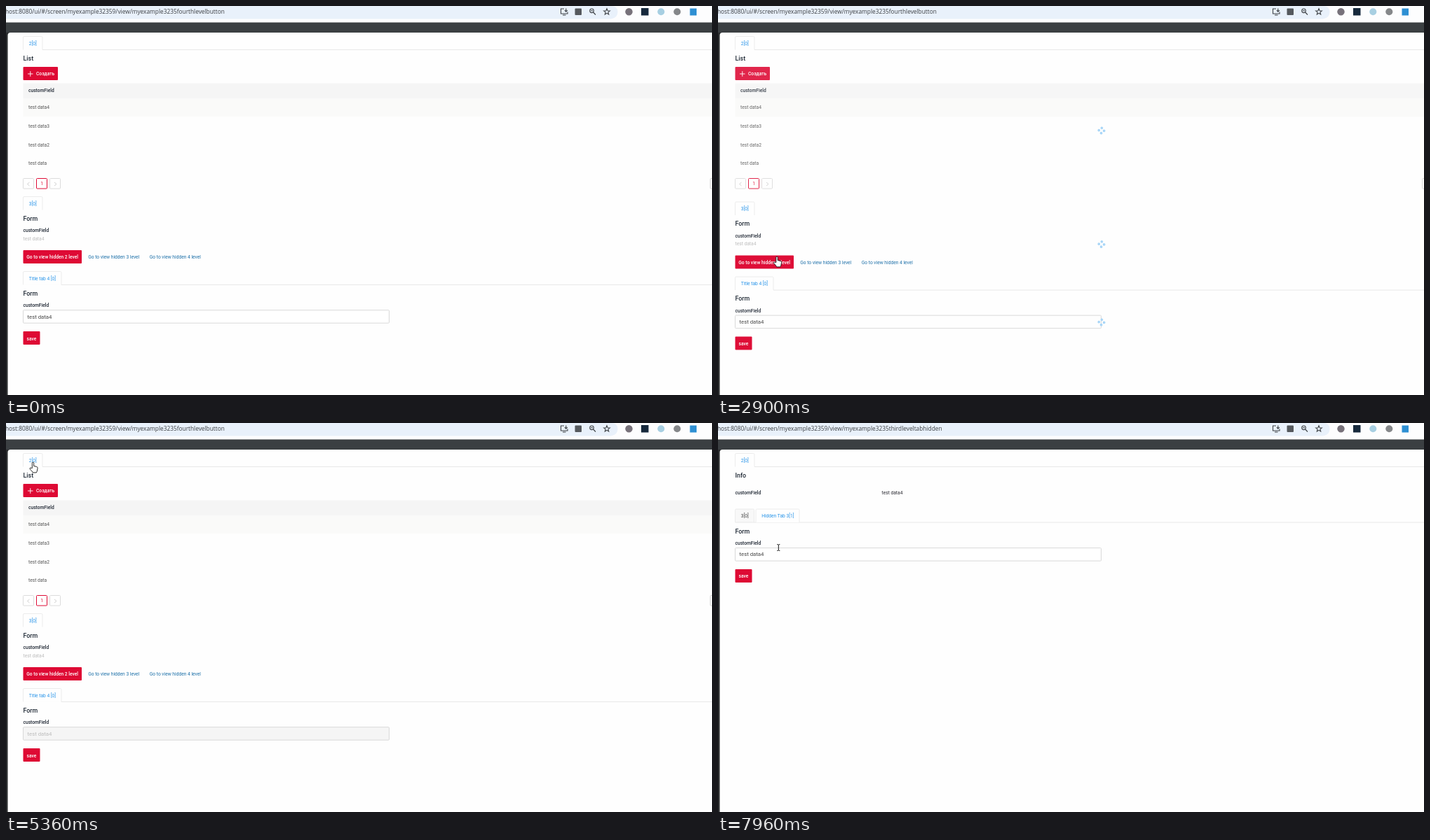
Write an HTML page that moves like this. It is 1007 px wide and 556 px high and loops after 7990 ms.

```html
<!DOCTYPE html>
<html lang="en">
<head>
<meta charset="utf-8">
<title>Hidden tabs</title>
<style>
html, body { margin: 0; width: 100%; height: 100%; overflow: hidden; background: #fefefe; }
svg { display: block; width: 100%; height: 100%; }
text { font-family: Roboto, Arial, sans-serif; font-size: 6.67px; fill: #555; white-space: pre; }
.url { font-family: "Open Sans", "Noto Sans", sans-serif; font-size: 8.32px; fill: #3b3e42; }
.title { font-size: 8.9px; font-weight: 500; fill: #1d2733; }
.label { font-weight: 500; fill: #1f2733; }
.tab { fill: #2492e8; }
.idle { fill: #444; }
.button { font-weight: 500; fill: #fff; }
.link { fill: #1b6fa8; }
.pale { fill: #bcbcbc; }
.dark { fill: #2b2b33; }
.value { font-size: 7.78px; fill: #444; }
.off .value { fill: #bcbcbc; }
.field { fill: #fff; stroke: #d9d9d9; }
.off .field { fill: #f5f5f5; }
.icon { fill: none; stroke: #3f4347; stroke-width: 1.1; }
</style>
</head>
<body>
<svg id="stage" viewBox="0 0 1007 556" preserveAspectRatio="none"></svg>
<script>
const LOOP = 7990;
const RED = '#de0a34';
const EDGE = '#ececec';
const stage = document.getElementById('stage');

const rect = (x, y, w, h, fill, extra = '') =>
  `<rect x="${x}" y="${y}" width="${w}" height="${h}" fill="${fill}" ${extra}/>`;
const text = (x, y, str, cls = '') => `<text x="${x}" y="${y}" class="${cls}">${str}</text>`;
const path = (d, extra = '') => `<path d="${d}" ${extra}/>`;
const group = (id, body, extra = '') => `<g id="${id}" ${extra}>${body}</g>`;
const disc = (x, r, fill) => `<circle cx="${x}" cy="8.3" r="${r}" fill="${fill}"/>`;

function tab(x, y, w, label, active) {
  return path(`M${x} ${y + 19.5}V${y + 2}q0-1.5 1.5-1.5H${x + w - 1.5}q1.5 0 1.5 1.5V${y + 19.5}`,
    `fill="${active ? '#fefefe' : '#f8f8f8'}" stroke="${EDGE}"`) +
    text(x + 8.2, y + 12.6, label, active ? 'tab' : 'idle');
}
const line = (x, y) => path(`M${x} ${y}H1007`, 'stroke="#e8e8e8"');

function button(x, y, w, label, textX = x + 5) {
  return rect(x, y, w, 19, RED, 'rx="1"') + text(textX, y + 12.4, label, 'button');
}

// Title, label, input and save button; y is the title's baseline
function editForm(y) {
  return text(24.5, y, 'Form', 'title') + text(24.5, y + 16.5, 'customField', 'label') +
    `<rect class="field" x="24.5" y="${y + 21}" width="522" height="18.5" rx="1"/>` +
    text(30.5, y + 32.8, 'test data4', 'value') + button(24.5, y + 51.4, 24, 'save');
}

function pager(x, mark, color) {
  return rect(x, 246.5, 15, 14.5, '#fff', `stroke="${color}" rx="1"`) + mark;
}

function info() {
  return text(24.5, 77.8, 'Info', 'title') + text(24.5, 101.7, 'customField', 'label') +
    text(233.5, 101.7, 'test data4', 'dark');
}

function chrome() {
  const star = Array.from({ length: 10 }, (_, i) => {
    const a = i * Math.PI / 5, r = i % 2 ? 2 : 4.6;
    return `${857 + r * Math.sin(a)},${8.3 - r * Math.cos(a)}`;
  }).join(' ');
  return rect(0, 0, 1007, 24, '#fdfdfe') +
    path('M0 0H863q9.500 0 9.500 8.500t-9.500 10H0z', 'fill="#e9f1fb"') +
    text(-1, 11.3, '', 'url') +
    path('M796 4H791.500V11H801V8.500M794 13H798.500M798.800 3.500V8M796.800 6.200L798.800 8.200L800.800 6.200', 'class="icon"') +
    rect(811.5, 3.5, 9.5, 9.5, '#55595e', 'rx="1"') +
    `<circle class="icon" cx="835.500" cy="6.800" r="2.800"/>` +
    path('M837.600 9L841 12.500M834 6.800H837', 'class="icon"') +
    `<polygon class="icon" points="${star}"/>` +
    disc(888.5, 5.2, '#77717a') + rect(906, 3, 10.5, 10.5, '#17293c') +
    disc(934.3, 5, '#a8cfe2') + disc(957.3, 5, '#85878a') +
    rect(975.5, 3.5, 9.5, 10, '#2e8fd3') +
    rect(0, 23.5, 1007, 15, '#3b3f42') + rect(0, 38, 12, 518, '#2a2c2e') +
    path('M2.500 556V42q0-4 4-4H1007V556z', 'fill="#fefefe"');
}

function listView() {
  const rows = ['test data4', 'test data3', 'test data2', 'test data']
    .map((s, i) => text(32, 147.4 + i * 26.55, s)).join('');
  return rect(24.5, 87, 49.5, 19, RED, 'rx="1"') +
    path('M31 97H38.500M34.750 93.200V100.800', 'stroke="#fff" stroke-width=".9"') +
    text(43, 99.4, 'Создать', 'button') +
    rect(24.5, 110.5, 983, 21.5, '#f5f5f5') + rect(24.5, 132, 983, 26.3, '#fafaf9') +
    text(32, 122.6, 'customField', 'label') + rows +
    pager(24.5, path('M33.500 252L30.500 254.500L33.500 257', 'fill="none" stroke="#c4c4c4" stroke-width=".8"'), '#dcdcdc') +
    pager(43.5, `<text x="49.300" y="256.200" style="fill:${RED}">1</text>`, RED) +
    pager(62.5, path('M69 252L72 254.500L69 257', 'fill="none" stroke="#c4c4c4" stroke-width=".8"'), '#dcdcdc') +
    pager(1004.5, '', '#d4d4d4');
}

function linkForm() {
  return text(24.5, 306.7, 'Form', 'title') + text(24.5, 323.2, 'customField', 'label') +
    text(24.5, 334.6, 'test data4', 'pale') +
    button(24.5, 349, 83.5, 'Go to view hidden 2 level', 29.3) +
    text(117.2, 361.4, 'Go to view hidden 3 level', 'link') +
    text(204.8, 361.4, 'Go to view hidden 4 level', 'link');
}

const spinner = y => `<g class="spin" data-y="${y}">` +
  [[0, -3.7], [3.7, 0], [0, 3.7], [-3.7, 0]]
    .map(([x, dy]) => `<circle cx="${x}" cy="${dy}" r="1.900" fill="#a9d6f7"/>`).join('') + '</g>';

const HAND = 'M-1.200 7.500V.300a1.200 1.200 0 0 1 2.400 0V4.500l3.900.900q1.600.500 1.500 2' +
  'l-.600 3.600q-.400 1.600-1.100 2.900h-5.200q-1-2.200-3.600-4.600q-1.100-1.300-.200-2.100q.900-.500 1.700.400z';
const outline = 'fill="#fff" stroke="#111" stroke-width=".9" stroke-linejoin="round"';

stage.innerHTML = chrome() +
  group('main',
    tab(24.5, 43, 27.5, '2[0]', true) + line(52, 62.5) + text(24.5, 77.8, 'List', 'title') +
    group('list', listView()) +
    group('lower',
      tab(24.5, 272, 27.5, '3[0]', true) + group('links', linkForm()) +
      tab(24.5, 379, 54.5, 'Title tab 4 [0]', true) + line(79, 398.5) +
      group('edit', editForm(413.7)))) +
  group('second',
    tab(24.5, 43, 27, '2[0]', false) + line(24.5, 62.5) +
    tab(54, 43, 61, 'Hidden tab 2[1]', true) + info()) +
  group('third',
    tab(24.5, 43, 27.5, '2[0]', true) + line(52, 62.5) + info() +
    tab(24.5, 122.5, 27, '3[0]', false) + line(24.5, 142) +
    tab(54, 122.5, 62, 'Hidden Tab 3[1]', true) + editForm(157.6)) +
  group('spins', spinner(178) + spinner(340.5) + spinner(452)) +
  group('pointer',
    path('M0 0V11.500L2.700 9L4.500 13L6.200 12.300L4.500 8.400H8z', `data-kind="arrow" ${outline}`) +
    path(HAND, `data-kind="hand" ${outline}`) +
    path('M-2-4.500Q0-4.500 0-3.500Q0-4.500 2-4.500M0-3.500V3.500M-2 4.500Q0 4.500 0 3.500Q0 4.500 2 4.500',
      'data-kind="beam" fill="none" stroke="#111" stroke-width="1"'));

const el = id => document.getElementById(id);
const show = (node, on) => { node.style.display = on ? '' : 'none'; };
const url = stage.querySelector('.url');
const spins = [...stage.querySelectorAll('.spin')];
const shapes = [...el('pointer').children];

// Pointer waypoints: time, x, y, shape worn from here on
const trail = [
  [120, 968, 544, 'arrow'], [300, 800, 400, 'arrow'], [480, 560, 270, 'arrow'],
  [620, 380, 237, 'arrow'], [780, 220, 275, 'arrow'], [940, 121, 344, 'arrow'],
  [1000, 112, 342, 'arrow'], [1060, 100, 350, 'hand'], [1250, 76, 357, 'hand'],
  [1400, 82, 359, 'hand'], [1820, 82, 359, 'hand'], [1910, 84, 363, 'hand'],
  [2080, 84, 363, 'hand'], [2120, 84, 359, 'hand'], [3440, 84, 359, 'arrow'],
  [3600, 112, 260, 'arrow'], [3750, 124, 130, 'arrow'], [3870, 104, 66, 'arrow'],
  [3900, 97, 61, 'hand'], [3930, 90.500, 57, 'hand'], [4360, 90.500, 57, 'hand'],
  [4700, 38.500, 57, 'hand'], [5470, 38.500, 57, 'hand'], [5530, 44, 70, 'arrow'],
  [5780, 110, 250, 'arrow'], [5960, 155, 357, 'hand'], [6030, 161, 374, 'hand'],
  [6100, 161, 374, 'hand'], [6280, 162.500, 360.500, 'hand'], [7540, 162.500, 360.500, 'arrow'],
  [7700, 138, 280, 'arrow'], [7860, 98, 197, 'beam'], [7960, 86.300, 178, 'beam'],
  [LOOP, 86.300, 178, 'beam']
];

function pointerAt(t) {
  const i = Math.max(1, trail.findIndex(p => p[0] > t));
  const [t0, x0, y0, kind] = trail[i - 1];
  const [t1, x1, y1] = trail[i];
  const k = (t - t0) / (t1 - t0);
  return { x: x0 + (x1 - x0) * k, y: y0 + (y1 - y0) * k, kind };
}

const between = (t, a, b) => t >= a && t < b;
const BASE = 'host:8080/ui/#/screen/myexample32359/view/myexample3235';
const loads = [[2830, 3150], [7230, 7500]];

function draw(t) {
  const second = between(t, loads[0][1], 4940);
  const third = t >= loads[1][1];
  show(el('main'), !second && !third);
  show(el('second'), second);
  show(el('third'), third);
  url.textContent = BASE + (second ? 'secondleveltabhidden' : third ? 'thirdleveltabhidden' : 'fourthlevelbutton');

  show(el('lower'), !between(t, 4940, 5040));
  show(el('edit'), !between(t, 4940, 5260));
  el('edit').setAttribute('class', between(t, 5260, 5440) ? 'off' : '');

  // Loading widgets fade to half and show a turning spinner
  const load = loads.find(([a, b]) => between(t, a, b));
  const age = load ? t - load[0] : 0;
  const fade = delay => 1 - 0.5 * Math.min(1, Math.max(0, age - delay) / 300);
  el('list').style.opacity = fade(0);
  el('links').style.opacity = el('edit').style.opacity = fade(60);
  el('lower').setAttribute('transform', `translate(0 ${load ? 7.5 : 0})`);
  show(el('spins'), load);
  for (const s of spins)
    s.setAttribute('transform', `translate(547 ${s.dataset.y}) rotate(${(age - 50) * 0.3})`);

  const p = pointerAt(t);
  show(el('pointer'), t >= 120);
  el('pointer').setAttribute('transform', `translate(${p.x} ${p.y})`);
  for (const s of shapes) show(s, s.dataset.kind === p.kind);
}

const start = performance.now();
function tick() {
  draw((performance.now() - start) % LOOP);
  requestAnimationFrame(tick);
}
tick();
</script>
</body>
</html>
```
